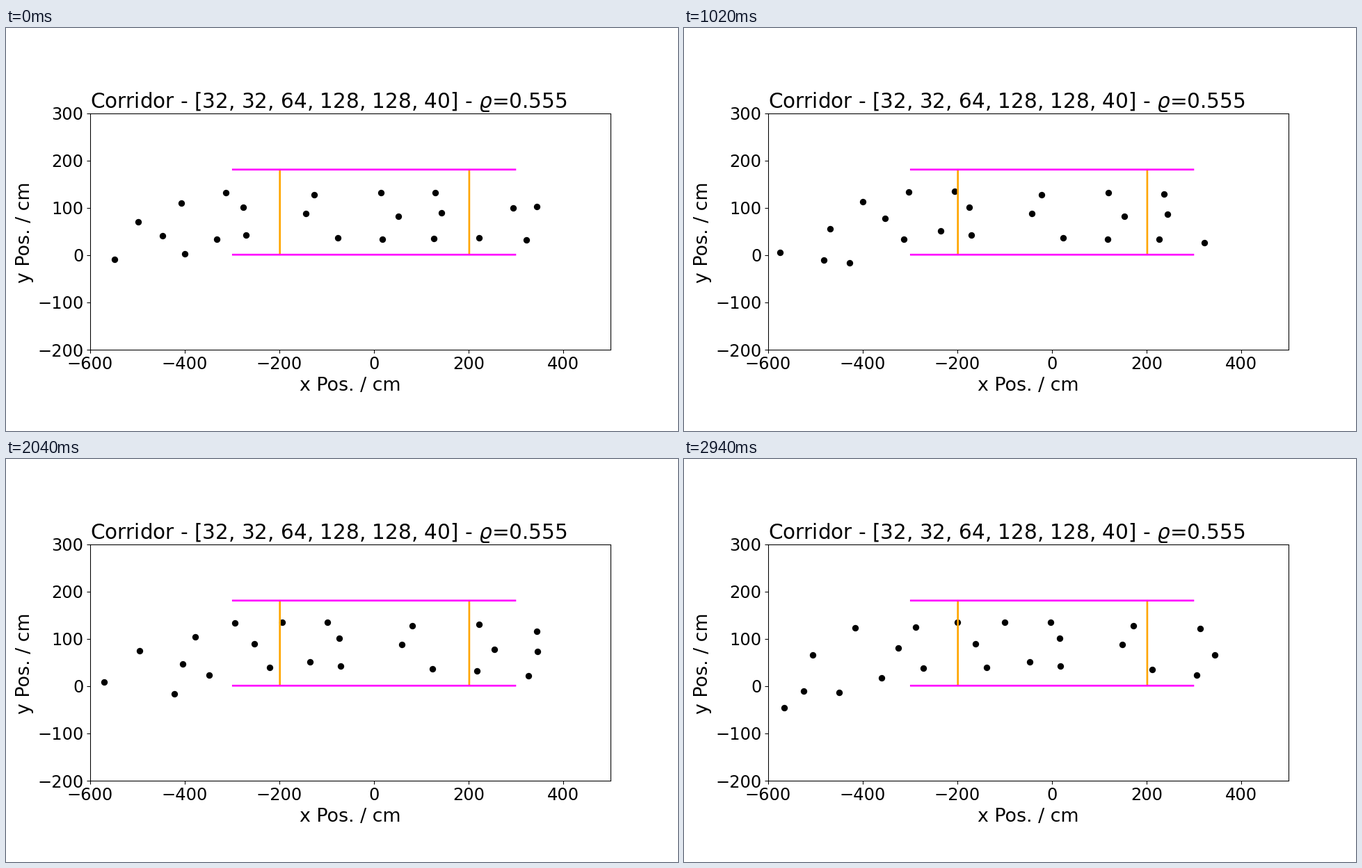
Write a matplotlib script that moves like this. It is 966 px wide and 580 px high and loops after 3000 ms.

```python
import matplotlib.pyplot as plt
import numpy as np
from matplotlib.animation import FuncAnimation

DPI = 96
FRAMES = 50
ZOOM = 1.00625      # font scale that goes with the stage width
ENTRANCE = 350      # left of here walkers squeeze into their lane
BEND = 640          # right of here they drift downwards

# Lane height and speed (pixels per frame), then where each walker starts:
# (x, y), with the frame of arrival in front for those who come later.
LANES = [
    (215, 4.4, [(10, 118, 344), (25, 117, 346), (40, 153, 360),
                (48, 142, 361)]),
    (233, 4.31, [(190, 279), (252, 252), (316, 237), (617, 237)]),
    (238, 4.15, [(156, 333), (443, 240), (539, 237)]),
    (263, 4.07, [(225, 299), (341, 258), (431, 267), (564, 271), (626, 266),
                 (729, 259), (763, 257), (8, 176, 359), (39, 202, 361)]),
    (286, 4.0, [(303, 304), (345, 298), (477, 302), (541, 304), (615, 303),
                (680, 302), (748, 305)]),
    (297, 3.72, [(257, 325), (7, 209, 359), (24, 216, 358)]),
]


def spread(x):
    return max(ENTRANCE - x, 0) ** 2 + 1200


def drift(x):
    return 0.0007 * max(x - BEND, 0) ** 2


def walk(lane, speed, start):
    """Map frame to position, at constant speed along a curve into the lane."""
    first, x, y = (0, *start)[-3:]
    scale = (y - drift(x) - lane) / spread(x)
    speed -= 0.02 * first

    def height(x):
        return lane + scale * spread(x) + drift(x)

    path = {}
    for n in range(first, FRAMES):
        y = height(x)
        if x + 0.45 * abs(y - 263) > 797.5:
            break
        path[n] = x, y
        x += speed / np.hypot(1, height(x + 1) - y)
    return path


PATHS = [walk(lane, speed, start)
         for lane, speed, starts in LANES for start in starts]


def crowd(n):
    """Positions at frame n, from stage pixels to centimetres."""
    px = np.array([path[n] for path in PATHS if n in path])
    return (px - (529.1, 326.93)) / (0.6806, -0.6806)


fig, ax = plt.subplots(figsize=(966 / DPI, 580 / DPI), dpi=DPI)
fig.subplots_adjust(left=0.125, right=0.9, bottom=0.11, top=0.88)
ax.set_aspect("equal")
ax.set_xlim(-600, 500)
ax.set_ylim(-200, 300)
ax.set_xticks(range(-600, 500, 200))
ax.set_yticks(range(-200, 301, 100))
ax.tick_params(labelsize=18 * ZOOM)
ax.set_xlabel("x Pos. / cm", fontsize=20 * ZOOM)
ax.set_ylabel("y Pos. / cm", fontsize=20 * ZOOM, y=0.495)
ax.set_title(r"Corridor - [32, 32, 64, 128, 128, 40] - $\varrho$=0.555",
             loc="left", fontsize=22 * ZOOM)

ax.vlines((-199, 201), 1, 181, color="orange", lw=2, snap=False)
ax.hlines((1, 181), -300, 300, color="magenta", lw=2, snap=False)
dots = ax.scatter(*crowd(0).T, s=36, color="black", zorder=1)


def update(n):
    dots.set_offsets(crowd(n))
    return (dots,)


anim = FuncAnimation(fig, update, frames=FRAMES, interval=60, repeat=True,
                     repeat_delay=0)
plt.show()
```
